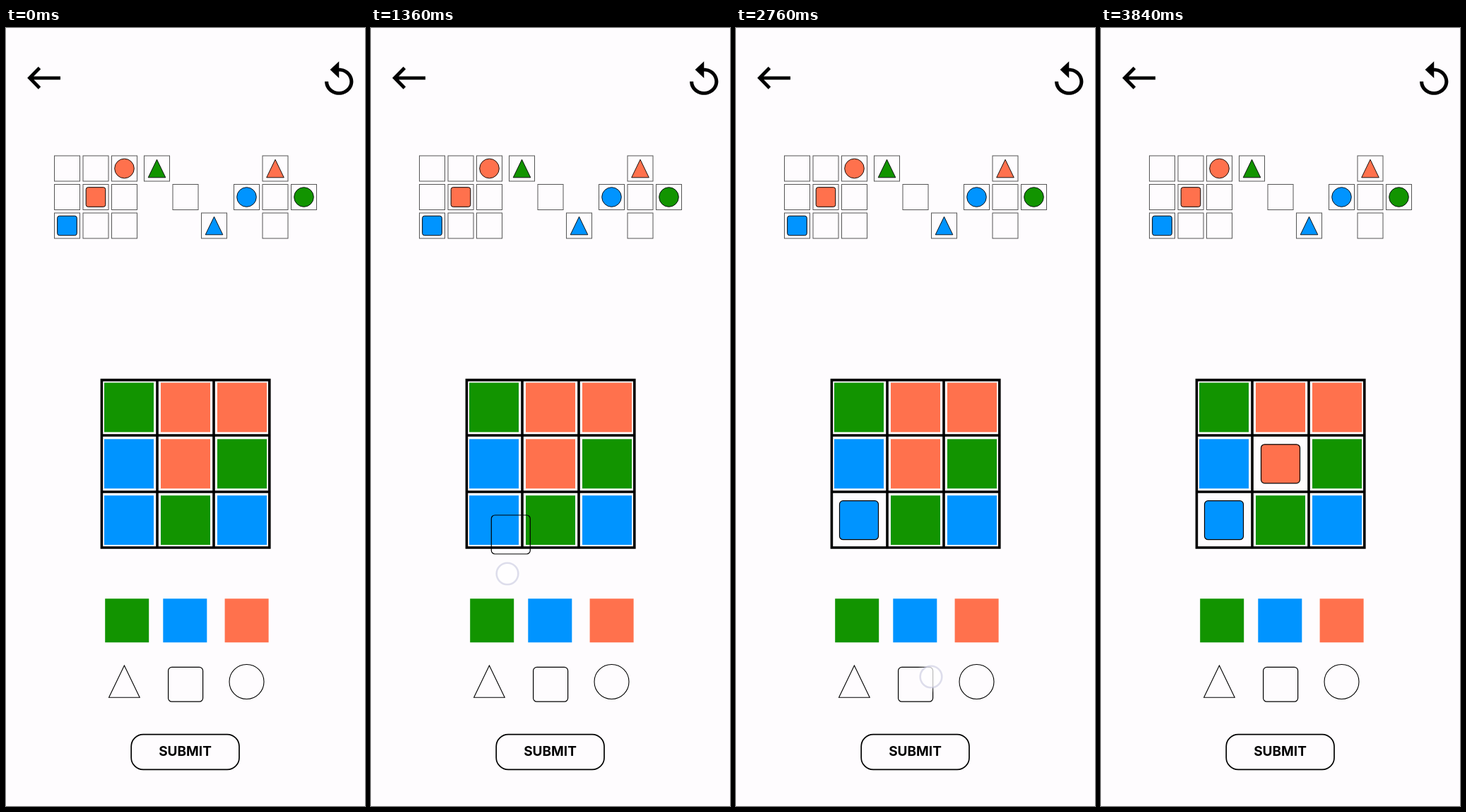
These frames come from a looping animation (508x1102 px, 4000 ms). An HTML page with a canvas:

```html
<!DOCTYPE html>
<html lang="en">
<head>
<meta charset="utf-8">
<title>Shape puzzle</title>
<style>
html, body { margin: 0; width: 100%; height: 100%; overflow: hidden; background: #fefcfe; }
canvas { display: block; width: 508px; height: 1102px; }
</style>
</head>
<body>
<canvas id="stage"></canvas>
<script>
const W = 508, H = 1102, LOOP = 4000, STEP = 40;
const GREEN = '#129400', BLUE = '#0094ff', ORANGE = '#ff714d', PAPER = '#fefcfe', INK = '#000';
const canvas = document.getElementById('stage');
const ratio = window.devicePixelRatio || 1;
canvas.width = W * ratio;
canvas.height = H * ratio;
const ctx = canvas.getContext('2d');
ctx.scale(ratio, ratio);

const replayIcon = new Path2D('M12 5V1L7 6l5 5V7c3.31 0 6 2.69 6 6s-2.69 6-6 6-6-2.69-6-6H4c0 4.42 3.58 8 8 8s8-3.58 8-8-3.58-8-8-8z');

const board = [
  [GREEN, ORANGE, ORANGE],
  [BLUE, ORANGE, GREEN],
  [BLUE, GREEN, BLUE]
];

// Clue cells: column x, row, optional shape and colour
const clues = [
  [68.5, 0], [109, 0], [149.5, 0, 'circle', ORANGE],
  [68.5, 1], [109, 1, 'square', ORANGE], [149.5, 1],
  [68.5, 2, 'square', BLUE], [109, 2], [149.5, 2],
  [195.5, 0, 'triangle', GREEN], [236, 1], [276.5, 2, 'triangle', BLUE],
  [363, 0, 'triangle', ORANGE], [322.5, 1, 'circle', BLUE], [363, 1],
  [403.5, 1, 'circle', GREEN], [363, 2]
];

// Finger paths: time, x, y
const drags = [
  { row: 2, col: 0, grab: 920, drop: 1720, gone: 1900, path: [
    [840, 256, 942], [900, 255, 930], [955, 247, 897], [1000, 242, 878],
    [1100, 230, 842], [1315, 198, 777], [1360, 193, 773], [1500, 180, 760], [1640, 174, 757]] },
  { row: 1, col: 1, grab: 2840, drop: 3640, gone: 3820, path: [
    [2760, 276, 919], [2840, 280, 908], [3000, 272, 808], [3130, 260, 738],
    [3235, 256, 699], [3355, 258, 682], [3400, 258, 682], [3520, 254, 676]] }
];
const LAG = 45;

function pointAt(path, t) {
  if (t <= path[0][0]) return path[0].slice(1);
  for (let i = 1; i < path.length; i++) {
    const [t0, x0, y0] = path[i - 1], [t1, x1, y1] = path[i];
    if (t < t1) {
      const k = (t - t0) / (t1 - t0);
      return [x0 + (x1 - x0) * k, y0 + (y1 - y0) * k];
    }
  }
  return path[path.length - 1].slice(1);
}

function paint(fill, stroke, width) {
  if (fill) { ctx.fillStyle = fill; ctx.fill(); }
  if (stroke) { ctx.strokeStyle = stroke; ctx.lineWidth = width; ctx.stroke(); }
}

function roundBox(x, y, w, h, r, fill, width) {
  ctx.beginPath();
  ctx.roundRect(x, y, w, h, r);
  paint(fill, INK, width);
}

function circle(x, y, r, fill, width) {
  ctx.beginPath();
  ctx.arc(x, y, r, 0, Math.PI * 2);
  paint(fill, INK, width);
}

function triangle(x, top, half, h, fill, width) {
  ctx.beginPath();
  ctx.moveTo(x, top);
  ctx.lineTo(x + half, top + h);
  ctx.lineTo(x - half, top + h);
  ctx.closePath();
  paint(fill, INK, width);
}

function block(x, y, size, color) {
  ctx.fillStyle = color;
  ctx.fillRect(x, y, size, size);
}

function drawHeader() {
  ctx.beginPath();
  ctx.moveTo(77, 70.8);
  ctx.lineTo(34, 70.8);
  ctx.moveTo(47.5, 56.5);
  ctx.lineTo(33.5, 70.8);
  ctx.lineTo(47.5, 85);
  paint(null, INK, 4.8);
  ctx.save();
  ctx.translate(441, 44.8);
  ctx.scale(2.52, 2.38);
  ctx.fillStyle = INK;
  ctx.fill(replayIcon);
  ctx.restore();
}

function drawClues() {
  for (const [x, row, shape, color] of clues) {
    const y = 181 + row * 40.5, cx = x + 18, cy = y + 18;
    ctx.strokeStyle = '#555';
    ctx.lineWidth = 1;
    ctx.strokeRect(x, y, 36, 36);
    if (shape === 'circle') circle(cx, cy, 13.8, color, 0.9);
    if (shape === 'square') roundBox(cx - 13.8, cy - 13.8, 27.6, 27.6, 3, color, 1);
    if (shape === 'triangle') triangle(cx, cy - 12.7, 12.3, 25.5, color, 0.9);
  }
}

function drawBoard(t) {
  board.forEach((colors, row) => colors.forEach((color, col) => {
    const cx = 174 + col * 80, cy = 537.4 + row * 79.9;
    const placed = drags.some(d => d.row === row && d.col === col && t >= d.drop);
    if (placed) roundBox(cx - 27.5, cy - 27.5, 55, 55, 5, color, 1.2);
    else block(cx - 35, cy - 35, 70, color);
  }));
  ctx.beginPath();
  ctx.rect(135.4, 498.6, 237.4, 237.4);
  for (const k of [0, 1]) {
    ctx.moveTo(214 + k * 80, 498);
    ctx.lineTo(214 + k * 80, 736);
    ctx.moveTo(135, 577 + k * 80);
    ctx.lineTo(373, 577 + k * 80);
  }
  paint(null, INK, 3.6);
}

function drawPalette() {
  block(140.2, 808.3, 62, GREEN);
  block(222.3, 808.3, 62, BLUE);
  block(309.6, 808.3, 62, ORANGE);
  triangle(167.4, 903, 21.8, 45.3, null, 1.1);
  roundBox(229.6, 905.4, 49, 48.8, 5, null, 1.2);
  circle(340.5, 926, 24.5, null, 1.1);
}

function drawSubmit() {
  roundBox(177.2, 1000.6, 152.8, 49.8, 17, null, 1.7);
  ctx.fillStyle = INK;
  ctx.font = '700 19px Inter, sans-serif';
  ctx.textAlign = 'center';
  ctx.textBaseline = 'alphabetic';
  ctx.fillText('SUBMIT', 253.5, 1031.4);
}

function drawFinger(x, y, alpha) {
  ctx.save();
  ctx.globalAlpha = alpha;
  const glow = ctx.createRadialGradient(x, y, 14, x, y, 23);
  glow.addColorStop(0, 'rgba(255,255,255,.4)');
  glow.addColorStop(1, 'rgba(255,255,255,0)');
  ctx.fillStyle = glow;
  ctx.beginPath();
  ctx.arc(x, y, 23, 0, Math.PI * 2);
  ctx.fill();
  ctx.beginPath();
  ctx.arc(x, y, 15.3, 0, Math.PI * 2);
  paint('rgba(255,255,255,.55)', 'rgba(195,195,220,.55)', 2.6);
  ctx.restore();
}

function drawDrag(d, t) {
  if (t < d.path[0][0] || t >= d.gone) return;
  if (t >= d.grab && t < d.drop) {
    const [x, y] = pointAt(d.path, t - LAG);
    roundBox(x - 27.7, y - 87, 55, 55, 5, null, 1.2);
  }
  const alpha = t < d.drop ? 1 : 1 - (t - d.drop) / (d.gone - d.drop);
  drawFinger(...pointAt(d.path, t), alpha);
}

function frame() {
  const t = Math.floor((performance.now() % LOOP) / STEP) * STEP;
  ctx.fillStyle = PAPER;
  ctx.fillRect(0, 0, W, H);
  drawHeader();
  drawClues();
  drawBoard(t);
  drawPalette();
  drawSubmit();
  drags.forEach(d => drawDrag(d, t));
  requestAnimationFrame(frame);
}
frame();
</script>
</body>
</html>
```
